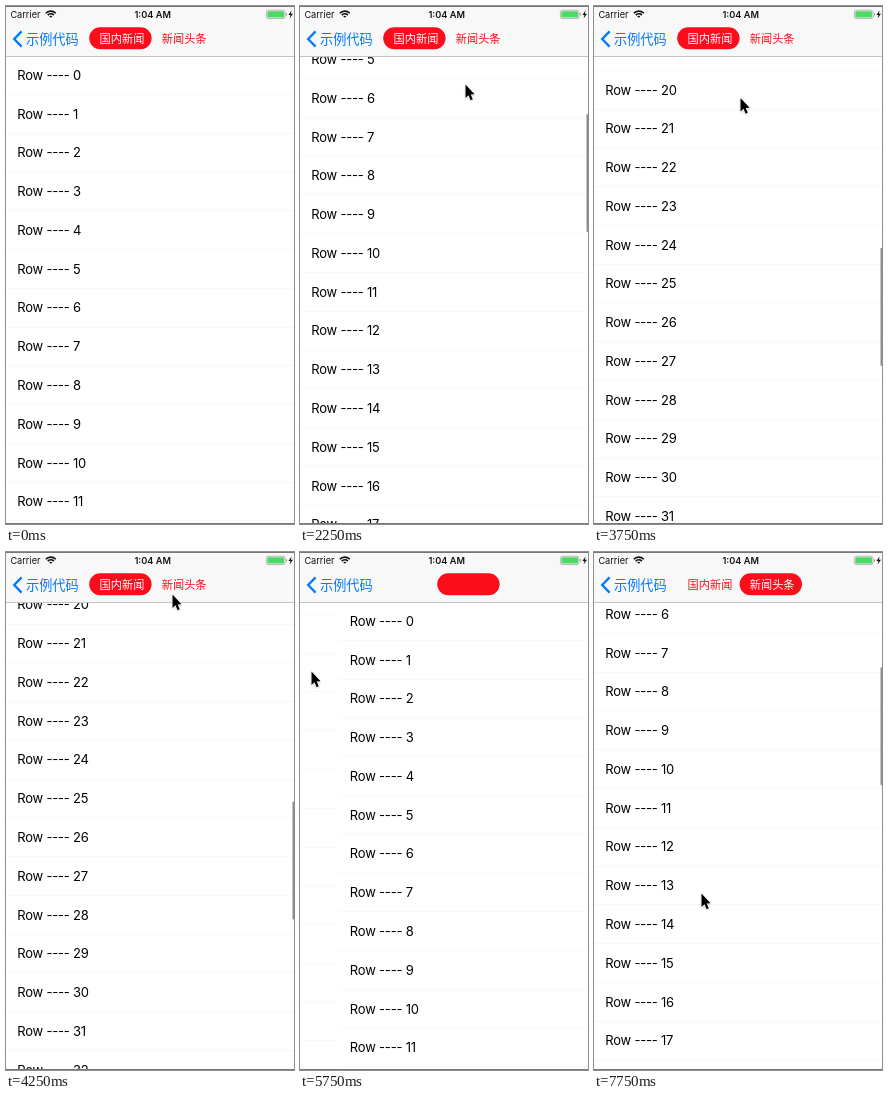
Recreate the animation shown at these times as an HTML page with a canvas. Size 288x518 px, loop 8000 ms.

```html
<!DOCTYPE html>
<html lang="zh">
<head>
<meta charset="utf-8">
<style>
  html, body { margin: 0; width: 100%; height: 100%; overflow: hidden; background: #fff; }
  canvas { display: block; width: 288px; height: 518px; }
</style>
</head>
<body>
<canvas id="stage"></canvas>
<script>
const W = 288, H = 518, LOOP = 8000, STEP = 250;
const BAR = 51, ROW = 38.77, ROWS = 50;
const RED = '#fc0d1b', BLUE = '#007aff', INK = '#111';
const LATIN = 'Inter, Roboto, sans-serif';
const CJK = '"Noto Sans CJK SC", "Noto Sans CJK", sans-serif';

// Places where the pointer turns: [seconds, x, y].
const turns = [[.5, 53, 45], [1.75, 174, 276], [2.25, 165, 78], [3.25, 126, 141],
  [4.25, 166, 42], [5.14, 260, 118], [5.75, 11, 119], [7.25, 113, 282], [7.75, 107, 341]];

const canvas = document.getElementById('stage');
const ctx = canvas.getContext('2d');
const ratio = window.devicePixelRatio || 1;
canvas.width = W * ratio;
canvas.height = H * ratio;

// Smooth progress from 0 to 1 between two times.
function ease(t, from, to) {
  const k = Math.min(1, Math.max(0, (t - from) / (to - from)));
  return k * k * (3 - 2 * k);
}

// A drag, then a flick that coasts to rest.
function firstScroll(t) {
  const dragged = 209.6, end = 801.4;
  if (t <= 2.25) return dragged * ease(t, 1.75, 2.25);
  return end - (end - dragged) * Math.exp(-1.457 * (t - 2.25) ** 1.5);
}

const secondScroll = t => 239.6 * ease(t, 7.25, 7.75);
const pageTurn = t => ease(t, 5.14, 5.932);

function pointerAt(t) {
  const next = Math.max(1, turns.findIndex(([time]) => time >= t));
  const [t0, x0, y0] = turns[next - 1], [t1, x1, y1] = turns[next];
  const k = ease(t, t0, t1);
  return [x0 + (x1 - x0) * k, y0 + (y1 - y0) * k];
}

function rect(x, y, w, h, color, radius = 0) {
  ctx.fillStyle = color;
  ctx.beginPath();
  ctx.roundRect(x, y, w, h, radius);
  ctx.fill();
}

function text(str, x, y, font, color, spacing = 0) {
  ctx.font = font;
  ctx.letterSpacing = spacing + 'px';
  ctx.fillStyle = color;
  ctx.fillText(str, x, y);
}

function polygon(points, color) {
  ctx.fillStyle = color;
  ctx.beginPath();
  points.forEach(([x, y]) => ctx.lineTo(x, y));
  ctx.closePath();
  ctx.fill();
}

function drawList(x, scroll, scrolling) {
  if (x <= -W || x >= W) return;
  ctx.save();
  ctx.translate(x, 0);
  for (let i = 0; i < ROWS; i++) {
    const y = 69 + i * ROW - scroll;
    if (y < 20 || y > H + 20) continue;
    text('Row ---- ' + i, 11.2, y + 4.8, '13px ' + LATIN, '#000', -.2);
    rect(0, Math.round(y + 18.9), W, 1, '#f8f8f8');
  }
  if (scrolling) rect(286.5, 57 + scroll * .243, 1.5, 118, 'rgba(0,0,0,.45)', .7);
  ctx.restore();
}

function drawStatus() {
  text('Carrier', 4.4, 11.6, '9.2px ' + LATIN, INK);
  ctx.textAlign = 'center';
  text('1:04 AM', 146.7, 11.6, '600 9.2px ' + LATIN, INK);
  ctx.textAlign = 'left';

  ctx.strokeStyle = INK;
  ctx.lineWidth = 1.6;
  for (const r of [1.4, 4.2, 6.9]) {
    ctx.beginPath();
    ctx.arc(44.8, 12, r, -Math.PI * .76, -Math.PI * .24);
    ctx.stroke();
  }

  ctx.strokeStyle = '#9a9a9a';
  ctx.lineWidth = .7;
  ctx.beginPath();
  ctx.roundRect(260.4, 4.2, 18.6, 8.4, 2);
  ctx.stroke();
  rect(261.4, 5.2, 16.6, 6.4, '#4cd964', 1.2);
  rect(279.8, 7, 1, 2.8, '#9a9a9a', .5);
  polygon([[285.6, 4.4], [282.4, 9], [284.5, 9], [283.6, 12.4], [287, 7.7], [284.9, 7.7]], INK);
}

function drawBar(turn) {
  rect(0, 0, W, BAR, '#f8f8f8');
  rect(0, 50, W, 1, '#c4c4c4');
  drawStatus();

  ctx.strokeStyle = BLUE;
  ctx.lineWidth = 2.3;
  ctx.beginPath();
  ctx.moveTo(15.6, 25.4);
  ctx.lineTo(8.2, 33);
  ctx.lineTo(15.6, 40.6);
  ctx.stroke();
  text('示例代码', 20, 37.8, '13.2px ' + CJK, BLUE);

  // The pill follows the page; the labels hide while it moves.
  rect(83.2 + turn * 62.4, 21.2, 62.4, 22, RED, 11);
  if (turn === 0 || turn === 1) {
    ['国内新闻', '新闻头条'].forEach((label, i) =>
      text(label, 93.6 + i * 62.2, 36.6, '11.2px ' + CJK, i === turn ? '#fff' : RED));
  }
}

function drawPointer(x, y) {
  const arrow = [[.5, .5], [.5, 14], [3.5, 11.3], [5.6, 16.2], [7.8, 15.2], [5.7, 10.5], [9.6, 10.2]];
  ctx.save();
  ctx.translate(x, y);
  ctx.shadowColor = 'rgba(0,0,0,.4)';
  ctx.shadowBlur = 2 * ratio;
  ctx.shadowOffsetY = ratio;
  polygon(arrow, '#fff');
  ctx.shadowColor = 'transparent';
  ctx.strokeStyle = '#fff';
  ctx.lineWidth = 1.4;
  ctx.stroke();
  polygon(arrow, '#000');
  ctx.restore();
}

function draw(t) {
  const turn = pageTurn(t);
  ctx.setTransform(ratio, 0, 0, ratio, 0, 0);
  rect(0, 0, W, H, '#fff');
  drawList(-turn * W, firstScroll(t), t >= 2 && t < 5);
  drawList((1 - turn) * W, secondScroll(t), t >= 7.5);
  drawBar(turn);
  rect(0, 0, W, 1, '#777');
  rect(0, H - 1, W, 1, '#777');
  if (t >= .25) drawPointer(...pointerAt(t));
}

function tick(now) {
  draw(Math.floor(now % LOOP / STEP) * STEP / 1000);
  requestAnimationFrame(tick);
}
requestAnimationFrame(tick);
</script>
</body>
</html>
```
